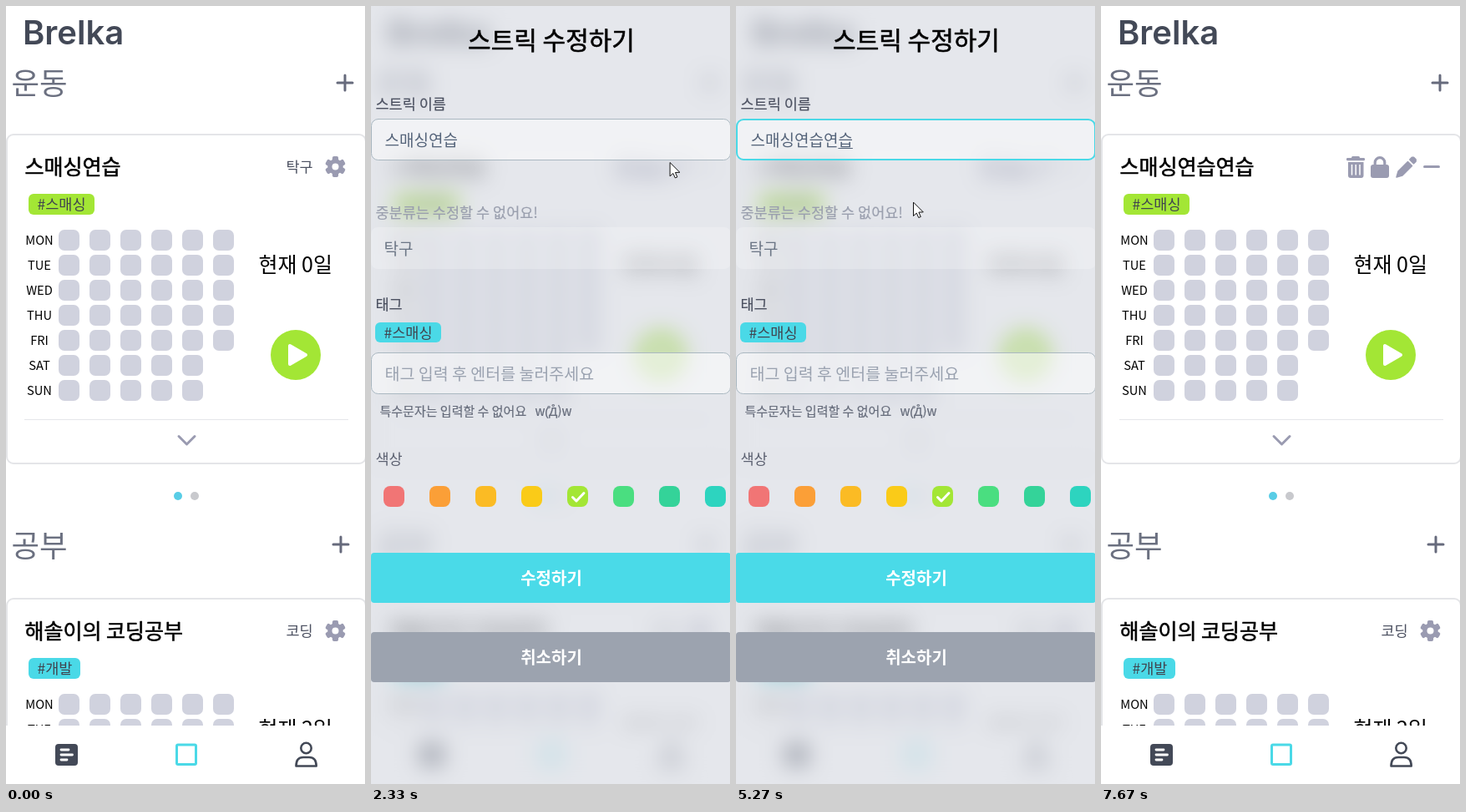
These frames come from a looping animation (430x932 px, 9 s). An HTML page with a canvas:

```html
<!DOCTYPE html>
<html lang="ko">
<head>
<meta charset="utf-8">
<style>
html, body { margin: 0; width: 100%; height: 100%; overflow: hidden; background: #fff; }
canvas { display: block; width: 430px; height: 932px; }
</style>
</head>
<body>
<canvas id="stage" width="430" height="932"></canvas>
<script>
const W = 430, H = 932, LOOP = 9000;
const stage = document.getElementById('stage').getContext('2d');
let g = stage;

const SANS = '"Noto Sans CJK KR", "Noto Sans CJK", "Noto Sans", sans-serif';
const CYAN = '#4ad9e7', LIME = '#a3e635', ICON = '#9a9bb1', DARK = '#484a60', SLATE = '#434957';
const NAME = '스매싱연습';

const clamp = v => Math.max(0, Math.min(1, v));
const ramp = (n, a, b) => clamp((n - a) / (b - a));
const mix = (a, b, k) => `rgb(${a.map((v, i) => Math.round(v + (b[i] - v) * k))})`;

function text(s, x, y, size, color, { weight = 400, align = 'left', bolder = 0 } = {}) {
  g.font = `${weight} ${size}px ${SANS}`;
  g.textAlign = align;
  g.textBaseline = 'middle';
  g.fillStyle = color;
  g.fillText(s, x, y);
  if (bolder) {
    g.strokeStyle = color;
    g.lineWidth = bolder;
    g.lineJoin = 'round';
    g.strokeText(s, x, y);
  }
}

function box(x, y, w, h, r, fill, stroke, line = 1) {
  g.beginPath();
  g.roundRect(x, y, w, h, r);
  if (fill) { g.fillStyle = fill; g.fill(); }
  if (stroke) { g.strokeStyle = stroke; g.lineWidth = line; g.stroke(); }
}

function disc(x, y, r, fill) {
  g.beginPath();
  g.arc(x, y, r, 0, Math.PI * 2);
  g.fillStyle = fill;
  g.fill();
}

function trace(points) {
  g.beginPath();
  points.forEach(([x, y], i) => i ? g.lineTo(x, y) : g.moveTo(x, y));
}

function line(points, color, width, cap = 'round') {
  trace(points);
  g.strokeStyle = color;
  g.lineWidth = width;
  g.lineCap = cap;
  g.lineJoin = 'round';
  g.stroke();
}

function shape(points, color, round = 0) {
  trace(points);
  g.closePath();
  g.fillStyle = color;
  g.fill();
  if (round) {
    g.strokeStyle = color;
    g.lineWidth = round;
    g.lineJoin = 'round';
    g.stroke();
  }
}

// ---- icons ----
function plus(x, y) {
  line([[x - 9, y], [x + 9, y]], '#666a7c', 3);
  line([[x, y - 9], [x, y + 9]], '#666a7c', 3);
}

function gear(x, y, color) {
  g.save();
  g.translate(x, y);
  for (let i = 0; i < 6; i++) {
    box(-3.6, -12.4, 7.2, 8, 2, color);
    g.rotate(Math.PI / 3);
  }
  g.restore();
  disc(x, y, 9.2, color);
  disc(x, y, 4, '#fff');
}

function trash(color) {
  box(294, 182, 22, 3.2, 1.2, color);
  box(300, 180, 10, 4, 1.5, color);
  box(296, 187, 18.5, 19, [0, 0, 3, 3], color);
  for (const x of [300.5, 305.2, 310]) line([[x, 190.5], [x, 202]], '#fff', 1.5);
}

function lock(color) {
  box(323, 190, 22, 16, 3, color);
  g.beginPath();
  g.moveTo(328.2, 192);
  g.lineTo(328.2, 187.5);
  g.arc(334, 187.5, 5.8, Math.PI, 0);
  g.lineTo(339.8, 192);
  g.strokeStyle = color;
  g.lineWidth = 3.2;
  g.stroke();
}

function pencil(color) {
  shape([[354, 205], [356, 198], [367.5, 186.5], [372.5, 191.5], [361, 203]], color, 1.5);
  shape([[370, 184], [372.5, 181.5], [374.5, 181.5], [377, 184], [377, 186], [374.5, 188.5]], color, 1.8);
}

function tools(cursor) {
  const tint = (x, half) =>
    cursor && Math.abs(cursor.x - x) < half && cursor.y > 179 && cursor.y < 206 ? DARK : ICON;
  trash(tint(305, 11));
  lock(tint(334, 13));
  pencil(tint(366, 13));
  line([[387.5, 192.5], [404.5, 192.5]], tint(396, 11), 3);
}

// ---- list page ----
function card(top, title, category, tag, tagWidth, tagColor, days) {
  g.save();
  g.translate(0, top);
  box(1, 1, 430, 394, 8, '#fff', '#e4e5e8', 2);
  text(title, 22.5, 39.5, 25, '#000', { weight: 500, bolder: 0.6 });
  if (category) text(category, 335.5, 39.5, 17.5, '#4b5060');
  box(27, 72, tagWidth, 25, 6, tagColor);
  text(tag, 37.5, 84.5, 17.5, '#40444f');
  ['MON', 'TUE', 'WED', 'THU', 'FRI', 'SAT', 'SUN'].forEach((day, row) => {
    text(day, 40, 127.5 + row * 30, 14.7, '#000', { align: 'center' });
    const weeks = row < 5 ? 6 : 5;
    for (let col = 0; col < weeks; col++) box(63 + col * 37, 115 + row * 30, 25, 25, 7, '#d0d2de');
  });
  text(`현재 ${days}일`, 302.5, 156, 25, '#000');
  disc(347, 265, 30, LIME);
  shape([[340, 254], [340, 276], [359, 265]], '#fff', 4);
  line([[22, 342.5], [410, 342.5]], '#e5e6ea', 1, 'butt');
  line([[207, 362.5], [216.5, 372], [226, 362.5]], ICON, 3);
  g.restore();
}

function navBar() {
  g.fillStyle = '#fff';
  g.fillRect(0, 862, W, 70);
  box(59, 884, 27, 26, 4, SLATE);
  [[891, 75], [897, 79.5], [903, 73]].forEach(([y, end]) => line([[66, y], [end, y]], '#fff', 2.8));
  box(204.5, 885, 23, 23.5, 1.5, null, CYAN, 3);
  g.beginPath();
  g.arc(359.5, 889, 6.2, 0, Math.PI * 2);
  g.moveTo(347.5, 910.5);
  g.bezierCurveTo(347.5, 903, 351, 900, 356, 900);
  g.lineTo(363, 900);
  g.bezierCurveTo(368, 900, 371.7, 903, 371.7, 910.5);
  g.closePath();
  g.strokeStyle = SLATE;
  g.lineWidth = 2.6;
  g.stroke();
}

function page(title, open, cursor) {
  g.fillStyle = '#fff';
  g.fillRect(0, 0, W, H);
  g.font = '600 40px Inter, sans-serif';
  g.textAlign = 'left';
  g.textBaseline = 'alphabetic';
  g.fillStyle = SLATE;
  g.fillText('Brelka', 20, 45.5);

  text('운동', 6.5, 92, 36.5, '#6b7080');
  plus(406, 92);
  card(153, title, open ? '' : '탁구', '#스매싱', 79, LIME, 0);
  if (open) tools(cursor);
  else gear(394.5, 192.5, cursor && Math.hypot(cursor.x - 394, cursor.y - 192) < 13 ? DARK : ICON);
  disc(206, 587, 5, '#58cde6');
  disc(226, 587, 5, '#c8c9cd');

  text('공부', 6.5, 646, 36.5, '#6b7080');
  plus(401, 645);
  card(709, '해솔이의 코딩공부', '코딩', '#개발', 62, CYAN, 2);
  gear(394.5, 748.5, ICON);
  navBar();
}

// ---- edit dialog ----
let backdrop;
function drawBackdrop() {
  if (!backdrop) {
    const make = () => Object.assign(document.createElement('canvas'), { width: W, height: H });
    const sharp = make();
    backdrop = make();
    g = sharp.getContext('2d');
    page(NAME, true, null);
    g = backdrop.getContext('2d');
    g.fillStyle = '#fff';
    g.fillRect(0, 0, W, H);
    g.filter = 'blur(13px)';
    g.drawImage(sharp, 0, 0);
    g.filter = 'none';
    g.fillStyle = 'rgba(209,213,221,.57)';
    g.fillRect(0, 0, W, H);
    g = stage;
  }
  g.drawImage(backdrop, 0, 0);
}

// [tick, text being added]
const typing = [[0, ''], [51, 'ㅇ'], [52, '여'], [55, ''], [65, 'ㅇ'], [66, '여'],
  [69, '연'], [70, '연ㅅ'], [71, '연스'], [79, '연습']];

function nameField(n) {
  const focused = n >= 42 && n < 92;
  const glow = n < 90 ? ramp(n, 41, 44) : 1 - ramp(n, 90, 94);
  const edge = focused ? 2 : 1;
  box(edge / 2, 135 + edge / 2, 431 - edge, 50 - edge, 8, 'rgba(255,255,255,.5)',
    mix([170, 184, 193], [74, 217, 231], glow), edge);
  const added = typing.filter(([start]) => n >= start).pop()[1];
  const left = focused ? 17.5 : 16.5;
  text(NAME + added, left, 160.5, 19, '#55647a', { weight: 300 });
  if (added && focused) {
    const end = left + g.measureText(NAME + added).width;
    const start = left + g.measureText(NAME + added.slice(0, -1)).width;
    g.fillStyle = '#55647a';
    g.fillRect(start, 170, end - start, 1);
  }
  if ((n >= 43 && n < 51) || (n >= 55 && n < 63)) {
    g.fillStyle = '#222';
    g.fillRect(104.4, 149, 1.5, 23);
  }
}

function dialog(n) {
  const label = { weight: 500, bolder: 0.2 };
  const button = { weight: 700, align: 'center' };
  drawBackdrop();
  text('스트릭 수정하기', 216, 41, 30, '#000', { weight: 500, align: 'center', bolder: 0.6 });
  text('스트릭 이름', 5.5, 117.5, 17.5, '#4b5060', label);
  nameField(n);

  text('중분류는 수정할 수 없어요!', 5.5, 247.5, 17.5, '#9a9fae', label);
  box(0, 265, 431, 50, 8, 'rgba(255,255,255,.22)');
  text('탁구', 15.5, 290.5, 19, '#6b7585', { weight: 300 });

  text('태그', 5.5, 357.5, 17.5, '#4b5060', label);
  box(5, 379, 79, 24, 6, CYAN);
  text('#스매싱', 15.5, 391.5, 17.5, '#40444f');
  box(0.5, 415.5, 430, 49, 8, 'rgba(255,255,255,.5)', '#aab8c1');
  text('태그 입력 후 엔터를 눌러주세요', 16.5, 440.5, 19.5, '#9aa2b0', { weight: 300 });
  text('특수문자는 입력할 수 없어요', 10.5, 485.5, 15, '#666c7b', label);
  text('w(\u030aД\u030a)w', 196.5, 485.5, 15, '#666c7b', label);

  text('색상', 5.5, 542.5, 17.5, '#5b6070');
  ['#f17575', '#fb9f37', '#fbbb24', '#facb18', LIME, '#4ade80', '#34d399', '#2dd4bf']
    .forEach((color, i) => box(15 + i * 55, 575, 25, 25, 8, color));
  line([[241.5, 588.5], [246, 593], [255, 583.5]], '#fff', 3);

  const hover = ramp(n, 86, 89) * (1 - ramp(n, 97, 100));
  box(0, 655, 431, 60, 4, mix([74, 218, 232], [43, 182, 198], hover));
  text('수정하기', 216, 685.5, 20, '#fff', button);
  box(0, 750, 431, 60, 4, '#9ca3af');
  text('취소하기', 216, 780.5, 20, '#fff', button);

  const toast = ramp(n, 95, 100);
  if (toast) {
    g.globalAlpha = toast;
    box(86.5, 846.5, 259, 41, 8, '#5fc3d0', '#8fd3dc');
    text(`'${NAME}연습' 스트릭을 수정했어요!`, 216, 867.5, 15, '#fff', button);
    g.globalAlpha = 1;
  }
}

// ---- pointer ----
const path = [[4, 426, 262], [9, 396, 192], [10, 395, 186], [17, 395, 186], [20, 345, 203], [21, 345, 200],
  [23, 366, 189], [34, 366, 189], [41, 214, 160], [43, 214, 160], [47, 212, 235], [79, 212, 235],
  [89, 244, 671], [93, 244, 671], [99, 440, 690]];
const clicks = [11, 28, 42, 92];

function pointerAt(n) {
  const i = path.findIndex(([tick]) => tick > n);
  if (i < 1) return null;
  const [a, ax, ay] = path[i - 1], [b, bx, by] = path[i];
  const k = ramp(n, a, b), e = k * k * (3 - 2 * k);
  return { x: ax + (bx - ax) * e, y: ay + (by - ay) * e };
}

function pointer(n, p) {
  g.save();
  g.translate(p.x + 0.5, p.y + 0.5);
  trace([[0, 0], [0, 16], [3.8, 12.6], [6.2, 18], [8.8, 17], [6.4, 11.6], [11.4, 11.4]]);
  g.closePath();
  g.fillStyle = '#fff';
  g.fill();
  g.strokeStyle = '#111';
  g.lineWidth = 1;
  g.stroke();
  g.restore();
  const start = clicks.find(c => n >= c && n < c + 5);
  if (start) disc(p.x, p.y - 0.5, 15, `rgba(236,246,20,${0.52 * (1 - (n - start) / 5)})`);
}

function draw(now) {
  const n = Math.floor((now % LOOP + 10.5) * 0.015);
  const p = pointerAt(n);
  if (n >= 35 && n < 115) dialog(n);
  else page(n >= 115 ? NAME + '연습' : NAME, n >= 13, p);
  if (p) pointer(n, p);
}

let origin;
function tick(now) {
  origin ??= now;
  draw(now - origin);
  requestAnimationFrame(tick);
}
draw(0);
requestAnimationFrame(tick);
</script>
</body>
</html>
```
